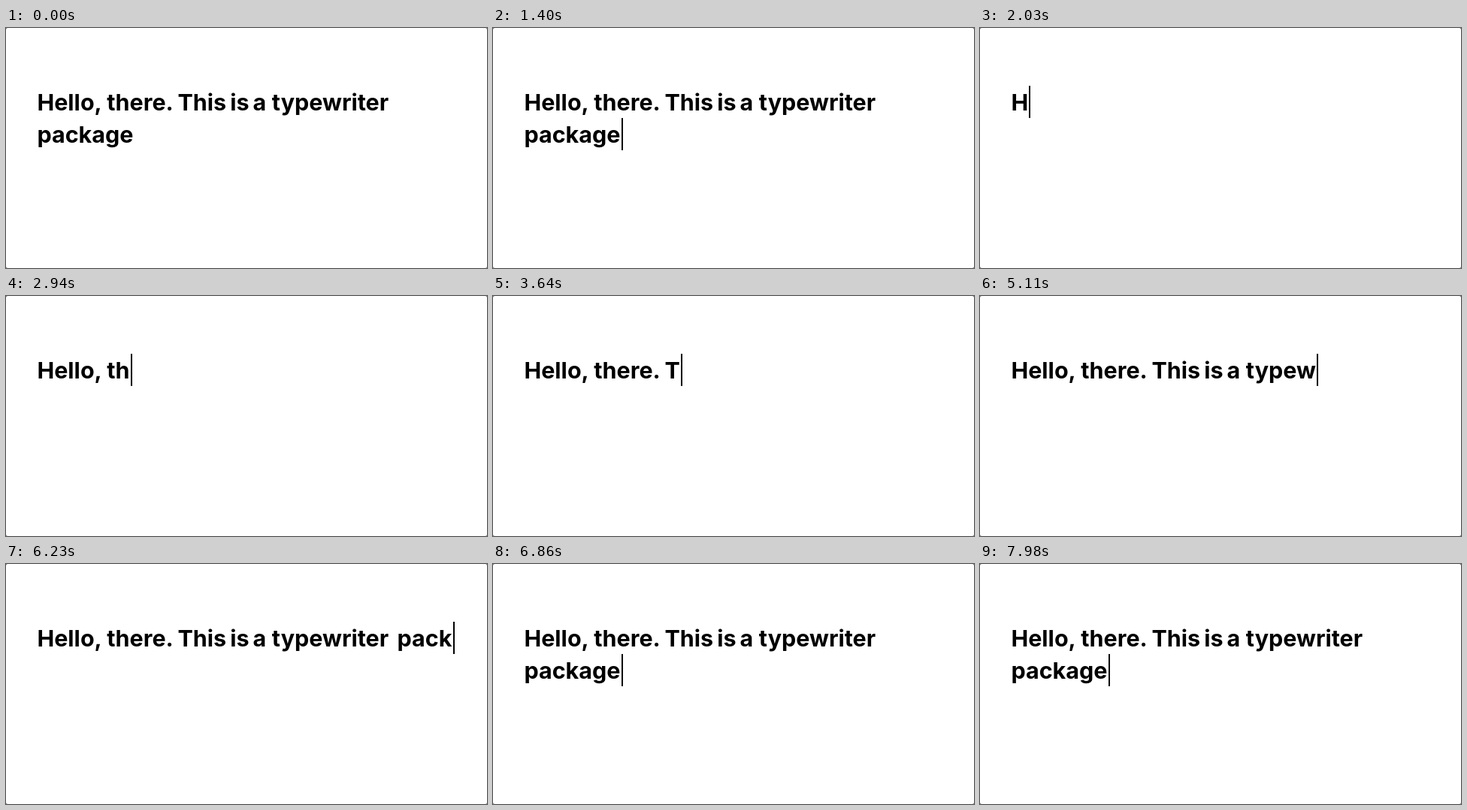
Animation, 640 px wide and 320 px high, one loop 8 s. Source, as an HTML page with a canvas:

```html
<!DOCTYPE html>
<html lang="en">
<head>
<meta charset="utf-8">
<title>Typewriter</title>
<style>
  html, body { margin: 0; width: 100%; height: 100%; overflow: hidden; background: #fff; }
  canvas { display: block; }
</style>
</head>
<body>
<canvas id="stage" width="640" height="320"></canvas>
<script>
const ctx = document.getElementById('stage').getContext('2d');

const LOOP = 8000, TICK = 70;
const CLEAR_AT = 1524, TYPE_FROM = 1915, CHAR_MS = 109, BLINK = 500;
const LEFT = 41.4, RIGHT_LIMIT = 620, TOP = 77, LINE = 43, BASELINE = 33;
const CARET_GAP = 1.2;

const TEXT = 'Hello, there. This is a typewriter package';
const WORD_X = [LEFT, 134.3, 228.5, 298.2, 328.5, 353.8, 520.5];
const TYPED_AT = TYPE_FROM + CHAR_MS * TEXT.length;

function charsAt(t) {
  if (t < CLEAR_AT) return TEXT.length;
  const count = Math.floor((t - TYPE_FROM) / CHAR_MS);
  return Math.max(0, Math.min(TEXT.length, count));
}

function caretAt(t) {
  if (t < CLEAR_AT) return Math.floor((t + 300) / BLINK) % 2 === 1;
  if (t < TYPED_AT) return true;
  return Math.floor((t - TYPED_AT) / BLINK) % 2 === 0;
}

function drawPage() {
  ctx.fillStyle = '#666';
  ctx.fillRect(0, 0, 640, 320);
  ctx.fillStyle = '#fff';
  ctx.beginPath();
  ctx.roundRect(0, 0, 640, 320, 2.5);
  ctx.fill();
}

// Draws the visible words and returns where the caret belongs.
function drawText(text) {
  let end = LEFT, row = 0;
  text.trimEnd().split(' ').forEach((word, i) => {
    let x = WORD_X[i];
    const width = ctx.measureText(word).width;
    if (x + width > RIGHT_LIMIT) {
      x = LEFT;
      row = 1;
    }
    ctx.fillText(word, x, TOP + row * LINE + BASELINE);
    end = x + width;
  });
  return { x: Math.round(end + CARET_GAP), y: TOP + row * LINE };
}

function draw(now) {
  const t = Math.floor((now % LOOP) / TICK) * TICK;
  const count = charsAt(t);
  drawPage();
  if (count) {
    ctx.fillStyle = '#000';
    ctx.font = '700 30.5px Inter, sans-serif';
    const caret = drawText(TEXT.slice(0, count));
    if (caretAt(t)) ctx.fillRect(caret.x, caret.y, 2, LINE);
  }
}

const start = performance.now();
function loop() {
  draw(performance.now() - start);
  requestAnimationFrame(loop);
}
loop();
</script>
</body>
</html>
```
